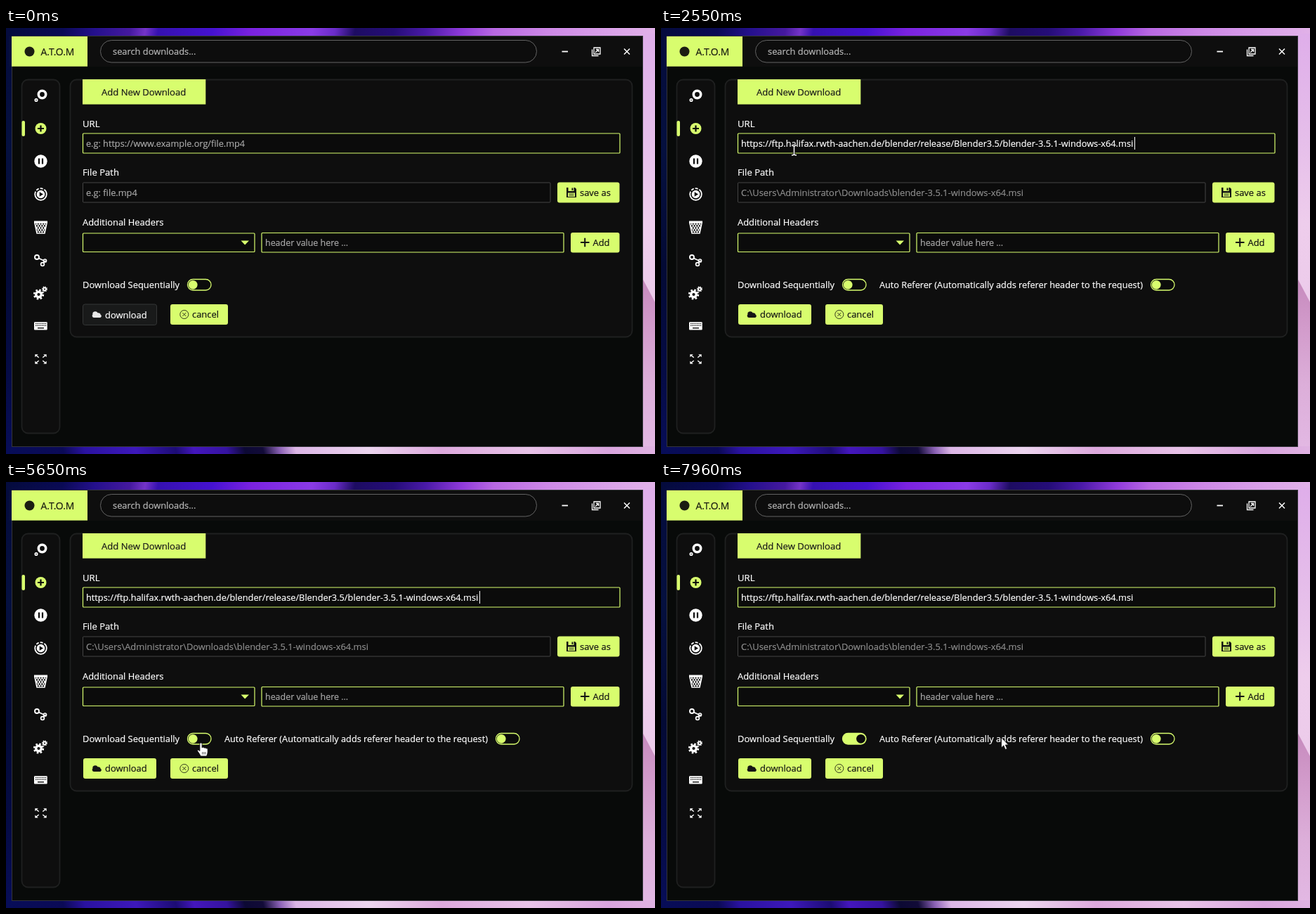
Write an HTML page that moves like this. It is 924x606 px and loops after 8 s.

```html
<!DOCTYPE html>
<html lang="en">
<head>
<meta charset="utf-8">
<title>Download manager</title>
<style>
  html, body { margin: 0; width: 100%; height: 100%; overflow: hidden; background: #080a09; }
  body { position: relative; }
  .wall, svg { position: absolute; }
  .top { left: 0; top: 0; width: 924px; height: 12px;
    background: linear-gradient(100deg, #040b3c, #0a0a55 80px, #24108c 125px, #45199f 175px, #7434c8 196px, #3511b0 214px,
      #4512d0 290px, #7a22e0 345px, #8a3be6 430px, #6a2cc8 462px, #1d0c62 490px, #250d78 545px,
      #4a1aa8 590px, #8f3ada 640px, #b868e2 685px, #cd88e6 760px, #d9a0e9 840px, #e3b5e8 924px); }
  .left { left: 0; top: 10px; width: 9px; height: 596px;
    background: linear-gradient(#040b3c, #05103f 160px, #030a35 330px, #050b45 480px, #070d58); }
  .right { left: 906px; top: 8px; width: 18px; height: 598px;
    background: linear-gradient(#dfaeea, #e5bdea 140px, #eecdec 270px, #eccbea 400px, #e3b9e4); }
  .wedge { left: 906px; top: 356px; width: 18px; height: 250px;
    clip-path: polygon(0 0, 100% 34px, 100% 100%, 0 100%);
    background: linear-gradient(#c68abd, #d29bcb 70px, #dcaed9 150px, #e3b9e4); }
  .bottom { left: 0; top: 595px; width: 924px; height: 11px;
    background: linear-gradient(75deg, #070d58, #0b0a56 80px, #2a12a0 110px, #3d18bb 180px, #1c0c74 235px, #4416bd 260px,
      #3513a0 305px, #0c0934 330px, #120b38 355px, #8b62b5 378px, #dcb6e6 400px, #ecd5ef 500px,
      #dda9dd 600px, #e8c3e8 720px, #d9a5de 830px, #e3b9e4 924px); }
  svg { left: 0; top: 0; }
  text { font-family: "Open Sans", "Noto Sans", sans-serif; white-space: pre; stroke-width: .2; }
</style>
</head>
<body>
<div class="wall top"></div><div class="wall left"></div><div class="wall right"></div>
<div class="wall wedge"></div><div class="wall bottom"></div>
<svg id="stage" width="924" height="606" viewBox="0 0 924 606"></svg>
<script>
const LIME = '#d8fd6e', DARK = '#0b0b0b', WHITE = '#fff', INK = '#141414', GREY = '#a8a8a8';
const LOOP = 8000, PASTE = 2550, CLICK = 6770;

const rect = (x, y, w, h, fill, stroke = 'none', r = 0, lw = 1, more = '') =>
  `<rect x="${x}" y="${y}" width="${w}" height="${h}" rx="${r}" fill="${fill}" stroke="${stroke}" stroke-width="${lw}" ${more}/>`;
const circle = (x, y, r, fill, stroke = 'none', lw = 1, more = '') =>
  `<circle cx="${x}" cy="${y}" r="${r}" fill="${fill}" stroke="${stroke}" stroke-width="${lw}" ${more}/>`;
const path = (d, fill, stroke = 'none', lw = 1, more = '') =>
  `<path d="${d}" fill="${fill}" stroke="${stroke}" stroke-width="${lw}" ${more}/>`;
const text = (x, mid, str, fill = WHITE, size = 12.95) =>
  `<text x="${x}" y="${mid + 4.6}" font-size="${size}" fill="${fill}" stroke="${fill}">${str}</text>`;
const group = (id, body) => `<g id="${id}">${body}</g>`;
const button = (x, y, w, h, tx, label) =>
  rect(x, y, w, h, LIME, 'none', 3) + text(tx, y + h / 2, label, INK);
const cloud = fill =>
  path('M125 412a2.6 2.6 0 0 1-1.6-4.4q-.6-4 3.2-4.4q3-.4 4 2q3.8-.4 4 2.6q2 1.2 1 3q-.6 1.2-2 1.2Z', fill);

const shell =
  rect(8.5, 11.5, 898, 584, '#080a09', '#34343a') +
  rect(9, 12, 897, 43, '#0e0e0e') +
  rect(8, 12, 108, 42.7, LIME) +
  circle(33.5, 33.5, 7, '#1b1d12') +
  text(49.5, 34, 'A.T.O.M', '#1b1d12', 13.9) +
  rect(134.5, 17.5, 621, 31.5, '#0d0d0d', '#636363', 15.7) +
  text(152, 33.5, 'search downloads...', '#b8b8b8', 12.85) +
  path('M791.5 33.5H800', 'none', WHITE, 1.8) +
  path('M837 28H846V37H837ZM834.5 30.5V39.5H843.5M839 35L843.5 30.5M840 30.5H843.5V34', 'none', WHITE, 1.3) +
  path('M880 29.5L888 37.5M888 29.5L880 37.5', 'none', WHITE, 1.5) +
  rect(22.5, 73.5, 54, 503, '#0e0e0e', '#1f2020', 9, 1.8) +
  rect(91.5, 73.5, 800, 366, '#0e0e0e', '#1f2020', 9, 1.8);

const meshLines = [0, 1, 2, 3, 4].map(i =>
  `M${40 + i * 3.7} 278l8 13M${59 - i * 3.7} 278l-8 13`).join('');
const keys = [420.7, 423.4].map(y =>
  path(`M42 ${y}H57.5`, 'none', DARK, 1.3, 'stroke-dasharray="1.3 1"')).join('');
const corners = [[-1, -1], [1, -1], [-1, 1], [1, 1]].map(([sx, sy]) =>
  `<g transform="translate(49.5 471) scale(${sx} ${sy})">` +
  path('M2.8 2.2L6.5 5.3', 'none', WHITE, 1.5) + path('M3.7 6.8H8.2V2.7Z', WHITE) + '</g>').join('');
const gear = (x, y, r, lw) =>
  circle(x, y, r, 'none', WHITE, lw) +
  circle(x, y, r + lw * .75, 'none', WHITE, lw * .75,
    `stroke-dasharray="${(r + lw * .75) * Math.PI / 8}"`);

const sidebar =
  circle(51.5, 94.5, 5.2, 'none', WHITE, 3.6) + circle(43, 102.5, 1.7, 'none', WHITE, 1.7) +
  rect(22.5, 132, 4.5, 22, LIME, 'none', 2) +
  circle(49.5, 143, 8, LIME) + path('M45 143H54M49.5 138.5V147.5', 'none', DARK, 2.2) +
  circle(49.5, 189.5, 9.2, WHITE) + path('M47 185.5V193.5M52 185.5V193.5', 'none', DARK, 2.2) +
  circle(49.5, 236.5, 8.3, 'none', WHITE, 1.8, 'stroke-dasharray="30 2 4 2 4 2"') +
  circle(49.5, 236.5, 5.8, WHITE) + path('M47.7 233.2V239.8L53 236.5Z', DARK) +
  path('M41 278L44 292H55L58 278', 'none', WHITE, 1.5) + path('M40 274.5H59V278H40Z', WHITE) +
  path(meshLines, 'none', WHITE, 1.1, 'clip-path="url(#bin)"') +
  path('M46.5 327.5L53 330.5M52.5 334.5L56 331', 'none', WHITE, 1.7) +
  circle(44, 326, 3, 'none', WHITE, 1.9) + circle(52, 336, 2.4, 'none', WHITE, 1.7) +
  circle(55.5, 331, 2, 'none', WHITE, 1.7) +
  gear(46.5, 379, 3.8, 3.4) + gear(55, 371.5, 2, 1.8) +
  rect(40, 418.3, 18.7, 11.2, WHITE, 'none', 1) + keys + path('M45 426.8H54', 'none', DARK, 1.4) +
  corners;

const form =
  rect(109, 73, 175.3, 35.6, LIME) + text(136, 91, 'Add New Download', '#1a1a1a', 13.1) +
  text(109, 136, 'URL', WHITE, 13.1) +
  rect(109.5, 150, 764.5, 28, DARK, LIME, 1, 1.2) +
  text(109, 205.5, 'File Path', WHITE, 13.1) +
  rect(109.5, 220, 665.5, 28, DARK, '#444', 1) +
  button(785, 219.5, 88.5, 29, 817, 'save as') +
  path('M798 227H810L812 229V241H798Z', INK) +
  rect(800.5, 227, 8, 5, LIME) + rect(805.5, 227.5, 1.8, 3.5, INK) +
  rect(800, 234.5, 10, 5.5, LIME) + path('M801.5 236.3H808.5M801.5 238.3H808.5', 'none', INK, .8) +
  text(109, 276.5, 'Additional Headers') +
  rect(109.5, 292, 244.5, 26.5, DARK, LIME, 1, 1.2) + path('M334.5 302.5H346L340.2 308.5Z', LIME) +
  rect(364, 291.5, 430, 27.5, DARK, LIME, 1, 1.2) +
  text(369, 305.5, 'header value here ...', GREY, 12.45) +
  button(804, 291, 69.5, 28.5, 835.5, 'Add') + path('M818 305H830.5M824.2 298.8V311.2', 'none', INK, 2) +
  text(109, 365.5, 'Download Sequentially') +
  button(234, 393, 82, 29, 265, 'cancel') +
  circle(253.8, 407.5, 6, 'none', '#30351c', 1) +
  path('M251.3 405L256.3 410M256.3 405L251.3 410', 'none', '#30351c', 1);

const toggle = (x, id) =>
  rect(x + .5, 357.5, 33.5, 15.5, DARK, LIME, 7.7, 1.3, `id="${id}Track"`) +
  circle(x + 8.2, 365.3, 6.4, LIME, 'none', 1, `id="${id}Knob"`);

const empty = group('empty',
  text(114, 164, 'e.g: https://www.example.org/file.mp4', GREY, 12.7) +
  text(114, 234, 'e.g: file.mp4', GREY, 12.8) +
  rect(109.5, 393, 105, 29.5, '#191a1a', '#343636', 3) + cloud('#e8e8e8') + text(141, 408, 'download'));

const filled = group('filled',
  text(114, 164, 'https://ftp.halifax.rwth-aachen.de/blender/release/Blender3.5/blender-3.5.1-windows-x64.msi', WHITE, 12.79) +
  text(114, 234, 'C:\\Users\\Administrator\\Downloads\\blender-3.5.1-windows-x64.msi', '#8c8c8c', 12.9) +
  text(311, 365.5, 'Auto Referer (Automatically adds referer header to the request)', WHITE, 12.72) +
  toggle(697, 'auto') + button(110, 393, 104, 29, 141, 'download') + cloud(INK));

const beam = 'M-3.5 -7Q-.5 -7 0 -5.5Q.5 -7 3.5 -7M0 -5.5V5.5M-3.5 7Q-.5 7 0 5.5Q.5 7 3.5 7';
const cursors = group('cursor',
  group('beam', path(beam, 'none', '#111', 3) + path(beam, 'none', WHITE, 1.4)) +
  group('hand',
    path('M-1.6 1.6a1.6 1.6 0 0 1 3.2 0V7c.6-1 2.6-.8 3 .4c.8-.9 2.4-.5 2.7.7c1-.6 2.4 0 2.4 1.4V13q0 3-1.6 6H-.4q-1-2.5-4.4-7.2c-.8-1.8 1.4-2.4 3.2-.2Z', WHITE, '#111', .9) +
    path('M2.2 13V16.5M4.3 13V16.5M6.4 13V16.5', 'none', '#333', .8)) +
  group('arrow', path('M0 0V14.5L3.3 11.4L5.7 17L8.2 15.9L5.9 10.5H10.2Z', WHITE, '#111', .9)));

const $ = id => document.getElementById(id);
$('stage').innerHTML =
  '<clipPath id="bin"><path d="M41 278H58L55 292H44Z"/></clipPath>' +
  shell + sidebar + form + toggle(258, 'seq') + empty + filled +
  rect(114, 155, 1, 18, WHITE, 'none', 0, 1, 'id="caret"') + cursors;

// Pointer hot spot: time, x, y
const route = [
  [510, 318, 598], [800, 268, 400], [1100, 212, 212], [1310, 193.5, 176], [1440, 193.5, 176],
  [1490, 189.5, 174], [3890, 189.5, 174], [4080, 214, 245], [4310, 238.5, 316.5],
  [5120, 238.5, 316.5], [5350, 259, 348], [5650, 277.5, 371], [6000, 277.5, 371],
  [6170, 281.5, 366.5], [7130, 281.5, 366.5], [7350, 372, 377], [7630, 483.5, 365.5],
  [7740, 483.5, 365.5], [7770, 484, 364], [7930, 484, 364], [7960, 484.5, 363.5], [8000, 484.5, 363.5]
];
const caretFlips = [1490, 1960, 2020, 3010, 3480, 3990, 4500, 5040, 5530, 5980, 6510, CLICK];

function pointer(t) {
  const i = Math.max(1, route.findIndex(p => p[0] > t));
  const [t0, x0, y0] = route[i - 1], [t1, x1, y1] = route[i];
  const k = (t - t0) / (t1 - t0);
  return [x0 + (x1 - x0) * k, y0 + (y1 - y0) * k];
}

function cursorKind(x, y, t) {
  const over = (l, top, r, b) => x >= l && x <= r && y >= top && y <= b;
  if (over(109, 150, 874, 178) || t < PASTE && over(109, 220, 775, 248)) return 'beam';
  if (over(109, 292, 354, 319) || over(258, 357, 292, 373) || over(234, 393, 316, 422)) return 'hand';
  return 'arrow';
}

const show = (id, on) => $(id).setAttribute('visibility', on ? 'visible' : 'hidden');
const set = (id, name, value) => $(id).setAttribute(name, value);

function draw(now) {
  const t = now % LOOP, pasted = t >= PASTE;
  $('empty').style.display = pasted ? 'none' : '';
  $('filled').style.display = pasted ? '' : 'none';

  show('caret', caretFlips.filter(f => f <= t).length % 2);
  set('caret', 'x', pasted ? 674 : 114);

  const k = t < CLICK ? 0 : t < 6840 ? .5 : 1;
  set('seqTrack', 'fill', k ? LIME : DARK);
  set('seqKnob', 'fill', k ? DARK : LIME);
  set('seqKnob', 'cx', 266.2 + 18.3 * k);

  const [x, y] = pointer(t), kind = cursorKind(x, y, t);
  $('cursor').style.display = t < 510 ? 'none' : '';
  set('cursor', 'transform', `translate(${x} ${y})`);
  for (const id of ['beam', 'hand', 'arrow']) show(id, id === kind);
}

function tick() {
  draw(performance.now());
  requestAnimationFrame(tick);
}
tick();
</script>
</body>
</html>
```
